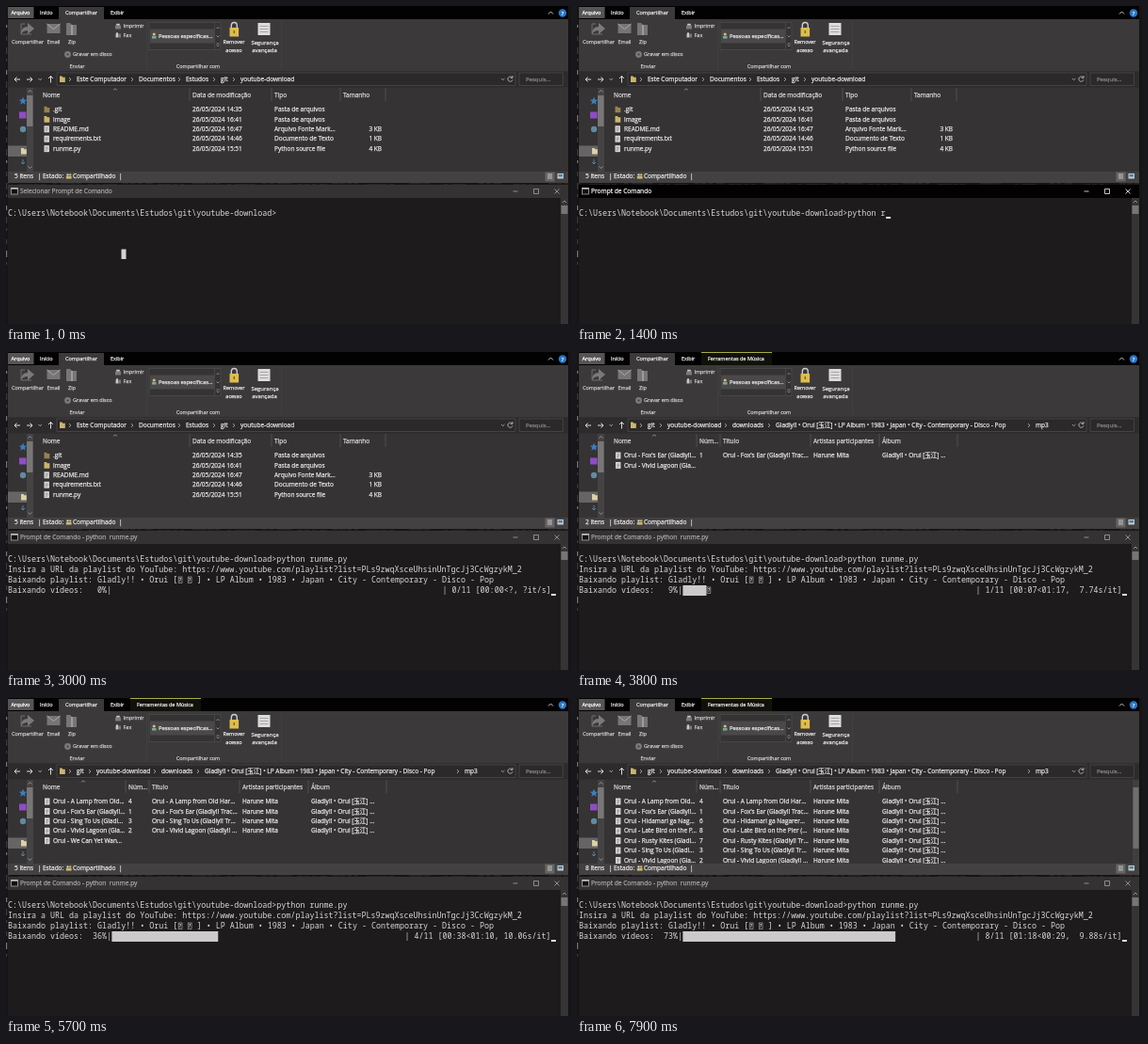
An HTML page for the animation above (8 s loop, 600 by 338 pixels).

```html
<!DOCTYPE html>
<html lang="pt">
<head>
<meta charset="utf-8">
<title>Baixando playlist</title>
<style>
html, body { margin: 0; width: 100%; height: 100%; overflow: hidden; background: #161415; }
svg { display: block; width: 100vw; height: 100vh; }
text { white-space: pre; font-family: "Open Sans", "Noto Sans", "Noto Sans CJK JP", sans-serif; }
.mono { font: 500 8.36px "Noto Sans Mono", "DejaVu Sans Mono", monospace; fill: #dad8d9; }
</style>
</head>
<body>
<svg viewBox="0 0 600 338" preserveAspectRatio="none">
  <defs><clipPath id="list"><rect x="30" y="86" width="567" height="90"/></clipPath></defs>
  <g id="fixed"></g>
  <g id="explorer"></g>
  <g id="terminal"></g>
</svg>
<script>
const LOOP = 8000;
const CELL = 5.017, COLS = 115, LINE = 11;
const ARTIST = 'Orui', KANJI = '玉江', ALBUM = 'Gladly!!', COMPOSER = 'Harune Mita';
const ALBUM_TAIL = ' • LP Album • 1983 • Japan • City - Contemporary - Disco - Pop';
const ALBUM_FULL = `${ALBUM} • ${ARTIST} [${KANJI}]${ALBUM_TAIL}`;
const PROMPT = 'C:\\Users\\Notebook\\Documents\\Estudos\\git\\youtube-download>';
const COMMAND = 'python runme.py';
const ASK = 'Insira a URL da playlist do YouTube: ';
const URL_TEXT = 'https://www.youtube.com/playlist?list=PLs9zwqXsceUhsinUnTgcJj3CcWgzykM_2';

// In download order; done is the time at which the counter advances.
const tracks = [
  { song: "Fox's Ear", done: 3600, stat: '00:07<01:17,  7.74' },
  { song: 'Vivid Lagoon', done: 4200, stat: '00:18<01:24,  9.38' },
  { song: 'Sing To Us', done: 4750, stat: '00:28<01:18,  9.82' },
  { song: 'A Lamp from Old Harbor', done: 5300, stat: '00:38<01:10, 10.06' },
  { song: 'We Can Yet Wander', done: 5900, stat: '00:48<01:00, 10.12' },
  { song: 'Hidamari ga Nagareru', done: 6450, stat: '00:58<00:50, 10.16' },
  { song: 'Rusty Kites', done: 7100, stat: '01:08<00:40, 10.02' },
  { song: 'Late Bird on the Pier', done: 7700, stat: '01:18<00:29,  9.88' }
];
tracks.forEach((track, i) => {
  track.number = i + 1;
  track.seen = i ? tracks[i - 1].done + 200 : 3300;
  track.title = `${ARTIST} - ${track.song} (${ALBUM} Track ${i + 1})`;
});
const sorted = [...tracks].sort((a, b) => a.song < b.song ? -1 : 1);

const TIMES = { focus: 900, type: 1000, run: 1750, ask: 1850, paste: 2150, playlist: 2350, bar: 2650, blur: 3000, open: 3300 };

const $ = id => document.getElementById(id);
const escapeText = s => String(s).replace(/&/g, '&amp;').replace(/</g, '&lt;');
const rect = (x, y, w, h, fill, extra = '') =>
  `<rect x="${x}" y="${y}" width="${w}" height="${h}" fill="${fill}" ${extra}/>`;
const circle = (x, y, r, fill) => `<circle cx="${x}" cy="${y}" r="${r}" fill="${fill}"/>`;
const stroke = (d, color, width = 1) => `<path d="${d}" fill="none" stroke="${color}" stroke-width="${width}"/>`;
const shape = (d, fill) => `<path d="${d}" fill="${fill}"/>`;
// y is the middle of the line
const label = (x, y, s, size = 6.5, fill = '#e6e4e5', anchor = 'start') =>
  `<text x="${x}" y="${y + size * 0.34}" font-size="${size}" fill="${fill}" stroke="${fill}" stroke-width=".25" text-anchor="${anchor}">${escapeText(s)}</text>`;
const folder = (x, y, fill = '#cdb46a') => shape(`M${x} ${y}h2.4l1 1.2h2.4v5.4h-5.8z`, fill);
const page = (x, y) => rect(x, y, 5.4, 7, '#dddbdc') + stroke(`M${x + 1.2} ${y + 2.2}h3m-3 1.6h3m-3 1.6h2`, '#777', .7);

const meter = document.createElement('canvas').getContext('2d');
function fit(s, width) {
  meter.font = '6.5px "Open Sans", "Noto Sans", "Noto Sans CJK JP", sans-serif';
  if (meter.measureText(s).width <= width) return s;
  while (meter.measureText(s + '...').width > width) s = s.slice(0, -1);
  return s + '...';
}

function drawRibbon() {
  const grey = '#7b797a', soft = '#c9c7c8', ink = '#e6e4e5';
  return rect(2, 0, 595, 14, '#030203') + rect(2, 1, 27.5, 12, '#565455') + rect(56, 1, 48, 13, '#3b393a') +
    label(15.5, 7, 'Arquivo', 5.5, '#fff', 'middle') + label(36, 7.5, 'Início', 5.5) +
    label(63, 7.5, 'Compartilhar', 5.5) + label(111, 7.5, 'Exibir', 5.5) +
    stroke('M576 8.5l2.5-2.5 2.5 2.5', '#ccc') + circle(591, 7.5, 4.2, '#2878c8') +
    label(591, 7.5, '?', 6, '#fff', 'middle') +
    rect(2, 14, 595, 55.5, '#3b393a') +
    shape('M23 18l7 6-7 6v-4q-5 0-7 4 0-8 7-8z', grey) + stroke('M20 19h-4v11h11', grey, .8) +
    rect(43.5, 19, 14, 10, '#777576') + stroke('M43.5 19l7 5.5 7-5.5', '#aaa') +
    shape('M64 18h4l2 2h5v11h-11z', '#777576') + stroke('M70 20v11', '#aaa', 1.5) +
    label(23, 38.5, 'Compartilhar', 5.5, soft, 'middle') + label(50.5, 38.5, 'Email', 5.5, soft, 'middle') +
    label(70, 38.5, 'Zip', 5.5, soft, 'middle') +
    rect(116, 20.5, 6, 4, grey) + rect(117.2, 18.8, 3.6, 1.8, soft) + label(124.5, 21.5, 'Imprimir', 5.4, soft) +
    rect(116, 29.5, 6, 4, grey) + rect(117, 28.3, 2, 5, soft) + label(124.5, 31.5, 'Fax', 5.5, soft) +
    circle(65.5, 51.5, 3.4, grey) + circle(65.5, 51.5, 1, '#3b393a') + label(71, 51.5, 'Gravar em disco', 5.5, soft) +
    label(75.5, 64, 'Enviar', 5.5, soft, 'middle') + label(204, 64, 'Compartilhar com', 5.5, soft, 'middle') +
    stroke('M149.5 16v51M292.5 16v51', '#444243', .8) +
    rect(152, 17.5, 76, 29, '#353334', 'stroke="#4f4d4e" stroke-width=".7"') + rect(153, 24.5, 68, 15, '#4a4849') +
    circle(157.2, 30, 1.6, '#d4bd67') + rect(155, 32, 4.5, 2.6, '#78a8a0') +
    label(162, 32, 'Pessoas específicas...', 5.85) +
    stroke('M221.5 17.5v29', '#4f4d4e', .7) +
    stroke('M223.5 24l1.5-1.5 1.5 1.5M223.5 31.5l1.5 1.5 1.5-1.5M223.5 40h3M223.5 41.5l1.5 1.5 1.5-1.5', '#aaa', .7) +
    stroke('M239.3 24v-3q0-3.5 3-3.5t3 3.5v3', '#cfcdce', 1.4) + rect(237.5, 23, 9.6, 9.5, '#dfbd4c') + rect(241.6, 26, 1.4, 3, '#73602a') +
    label(242, 38.5, 'Remover', 5.5, ink, 'middle') + label(242, 47, 'acesso', 5.5, ink, 'middle') +
    rect(267.5, 18, 13, 13, '#dedcdd') + stroke('M269.5 21.5h9M269.5 24.5h9M269.5 27.5h9', '#999', .8) +
    label(275, 38.5, 'Segurança', 6, ink, 'middle') + label(274.5, 47, 'avançada', 6, ink, 'middle');
}

function drawFrame() {
  let flecks = '';
  for (let i = 0; i < 60; i++) flecks += rect((i * 37) % 600, 188.5 + i % 2, 4 + i % 5, .7, '#343233');
  for (let i = 0; i < 22; i++) flecks += rect(0, 20 + i * 12, 1.2, 3 + i % 3 * 2, i % 4 ? '#3b393a' : '#777');
  const nav = stroke('M9 78h6M11.5 75.5l-2.5 2.5 2.5 2.5', '#ddd') + stroke('M22 78h6M25.5 75.5l2.5 2.5-2.5 2.5', '#ddd') +
    stroke('M34.5 77l1.7 1.7 1.7-1.7', '#ccc', .8) + stroke('M47.5 81.5v-7M45 77l2.5-2.5 2.5 2.5', '#ddd');
  const side = rect(2, 148.5, 20, 11.5, '#666465') + shape('M18 96.5l1.2 3 3 .2-2.3 2 .8 3-2.7-1.7-2.7 1.7.8-3-2.3-2 3-.2z', '#3a7fbd') +
    rect(14, 112.5, 7.5, 7, '#8f4cc4') + circle(18, 131, 3.2, '#5f8ba3') + folder(16, 151, '#ddd2a4') +
    stroke('M18 163v5M16 166l2 2 2-2', '#658aa8', .9);
  return flecks + rect(2, 0, 595, 188, '#353334') + drawRibbon() +
    rect(2, 69.5, 595, 17, '#2d2b2c') + nav +
    rect(54, 71, 487, 13.5, '#2b292a', 'stroke="#4f4d4e" stroke-width=".7"') +
    rect(545, 71, 46.5, 13.5, '#2b292a', 'stroke="#4f4d4e" stroke-width=".7"') +
    folder(57, 74.5) + label(552, 78, 'Pesquis...', 6, '#858384') +
    stroke('M526 77l1.7 1.7 1.7-1.7', '#bbb', .8) + stroke('M537.5 76a2.6 2.6 0 1 0 .5 2.3M538 74v2.4h-2.3', '#ccc', .8) +
    side + rect(22, 87, 7, 89, '#444243') + rect(22, 95, 6.5, 33, '#787677') +
    stroke('M23.5 91.5l2-2 2 2M23.5 170.5l2 2 2-2', '#aaa', .8) +
    rect(2, 176, 595, 12, '#434142') + label(34, 181, '|', 6.3) + label(120, 181, '|', 6.3) + label(39, 181, 'Estado:') +
    circle(65.5, 179.5, 1.2, '#ccc') + circle(68.2, 179.5, 1.2, '#d1b862') + rect(63.8, 181, 5.8, 2.6, '#c9b873') +
    label(71, 181, 'Compartilhado') +
    rect(572.5, 176.5, 10, 10, '#666465') + stroke('M575 179h5M575 181h5M575 183h5', '#ddd', .8) +
    rect(585.5, 178, 6.5, 5.5, '#ccc') + rect(586.5, 179, 4.5, 2.5, '#4582aa') +
    rect(2, 203, 595, 135, '#1d1b1c') + rect(589, 204, 8, 134, '#363435') +
    rect(589.5, 212, 7, 9, '#777576') + stroke('M591 209l2-2 2 2', '#aaa', .8);
}

const crumbs = items => items.map(([x, name]) =>
  stroke(`M${x - 8} 76l1.8 2-1.8 2`, '#bbb', .8) + label(x, 78, name)).join('');
const header = (columns, edges) =>
  columns.map(([x, name]) => label(x, 94.5, name, 6.5, '#d8d6d7')).join('') +
  edges.map(x => stroke(`M${x} 87v14`, '#5d5b5c', .7)).join('');
const rowY = i => 110 + i * 10.42;

function drawRepository() {
  const rows = [
    ['.git', '14:35', 'Pasta de arquivos'], ['image', '16:41', 'Pasta de arquivos'],
    ['README.md', '16:47', 'Arquivo Fonte Mark...', '3 KB'],
    ['requirements.txt', '14:46', 'Documento de Texto', '1 KB'],
    ['runme.py', '15:51', 'Python source file', '4 KB']
  ];
  return crumbs([[75, 'Este Computador'], [141, 'Documentos'], [191, 'Estudos'], [228, 'git'], [249, 'youtube-download']]) +
    header([[39, 'Nome'], [198, 'Data de modificação'], [285, 'Tipo'], [358, 'Tamanho']], [195, 282, 355, 403]) +
    stroke('M114 89.5l2-1.7 2 1.7', '#aaa', .7) +
    rows.map(([name, time, kind, size], i) => {
      const y = rowY(i);
      return (i < 2 ? folder(40.5, y - 3.3, i ? '#cdb46a' : '#96834d') : page(40.5, y - 3.5)) +
        label(50, y, name) + label(198, y, '26/05/2024 ' + time) + label(285, y, kind) +
        (size ? label(399, y, size, 6.5, '#e6e4e5', 'end') : '');
    }).join('') + label(9, 181, '5 itens');
}

function drawMusic(t) {
  const files = sorted.filter(track => t >= track.seen);
  const rows = files.map((track, i) => {
    const y = rowY(i);
    const tags = t < track.done ? '' : label(130, y, track.number) + label(155, y, fit(track.title, 91)) +
      label(251, y, COMPOSER) + label(324, y, `${ALBUM} • ${ARTIST} [${KANJI}] ...`);
    return page(41, y - 3.5) + label(50, y, fit(track.title, 77)) + tags;
  }).join('');
  return rect(132, 0, 75, 14, '#10110a') + rect(132, 0, 75, 1, '#a9ad45') + label(139, 7.5, 'Ferramentas de Música', 5.5) +
    crumbs([[75, 'git'], [96, 'youtube-download'], [165, 'downloads'], [211, ALBUM_FULL], [487, 'mp3']]) +
    header([[39, 'Nome'], [130, 'Núm...'], [155, 'Título'], [251, 'Artistas participantes'], [324, 'Álbum']], [127, 152, 248, 321, 404]) +
    stroke('M80 89.5l2-1.7 2 1.7', '#aaa', .7) +
    `<g clip-path="url(#list)">${rows}</g>` +
    (files.length > 6 ? rect(590, 87, 7, 89, '#403e3f') + rect(590.5, 95, 6, 65, '#706e6f') : '') +
    label(9, 181, `${files.length} ite${files.length > 1 ? 'ns' : 'm'}`);
}

const colX = col => 2 + col * CELL;
const lineY = row => 223 + row * LINE;
const mono = (col, row, s) => `<text class="mono" x="${colX(col)}" y="${lineY(row)}">${escapeText(s)}</text>`;
const caret = (col, row) => rect(colX(col), lineY(row) + 1, CELL, 2, '#e0dedf');
const missing = (col, row) =>
  rect(colX(col) + .6, lineY(row) - 6, 3.8, 6.6, 'none', 'stroke="#bbb" stroke-width=".6"') +
  label(colX(col) + 2.5, lineY(row) - 2.6, '?', 5, '#ccc', 'middle');

function drawPlaylist() {
  const head = `Baixando playlist: ${ALBUM} • ${ARTIST} [`, n = head.length;
  return mono(0, 2, head) + missing(n, 2) + missing(n + 2, 2) + mono(n + 4, 2, ']' + ALBUM_TAIL);
}

function drawProgress(t) {
  const done = tracks.filter(track => t >= track.done).length;
  const stat = done ? `| ${done}/11 [${tracks[done - 1].stat}s/it]` : '| 0/11 [00:00<?, ?it/s]';
  const percent = String(Math.round(done / 11 * 100)).padStart(3);
  const start = 22, width = COLS - stat.length - start;
  const eighths = Math.floor(width * done / 11 * 8);
  const full = eighths >> 3, part = eighths & 7;
  // The console font only has the half block among the partial ones.
  const filled = full + (part === 4 ? .5 : 0);
  return mono(0, 3, `Baixando vídeos: ${percent}%|`) +
    rect(colX(start), lineY(3) - 8, filled * CELL, LINE, '#cccacb') +
    (part && part !== 4 ? missing(start + full, 3) : '') +
    mono(COLS - stat.length, 3, stat) + caret(COLS, 3);
}

function drawTerminal(t) {
  const T = TIMES, active = t >= T.focus && t < T.blur;
  const ink = active ? '#f4f2f3' : '#a5a3a4';
  const title = t < T.focus ? 'Selecionar Prompt de Comando'
    : 'Prompt de Comando' + (t >= T.run ? ' - python  runme.py' : '');
  const typed = COMMAND.slice(0, Math.max(0, Math.floor((t - T.type) / 50)));
  let out = rect(2, 190, 595, 14, active ? '#030203' : '#343233') +
    rect(5.5, 193.5, 7, 6.5, '#111', 'stroke="#aaa" stroke-width=".8"') + rect(5.5, 193.2, 7, 1.5, '#ccc') +
    label(15, 197, title, 6.6, ink) +
    stroke('M538.5 197h5M560.5 194.5h5v5h-5zM582.5 194.5l5 5m0-5l-5 5', ink, .8) +
    mono(0, 0, PROMPT + typed);
  if (t < T.focus) out += rect(122.5, 258.5, 5, 10.5, '#d4d2d3');
  else if (t < T.ask) out += caret(PROMPT.length + typed.length, 0);
  if (t >= T.ask) {
    const line = ASK + (t >= T.paste ? URL_TEXT : '');
    out += mono(0, 1, line);
    if (t < T.playlist) out += caret(line.length, 1);
  }
  if (t >= T.playlist) out += drawPlaylist();
  if (t >= T.bar) out += drawProgress(t);
  else if (t >= T.playlist) out += caret(0, 3);
  return out;
}

function put(id, markup) {
  const node = $(id);
  if (node.markup !== markup) node.innerHTML = node.markup = markup;
}
function render(t) {
  put('explorer', t < TIMES.open ? drawRepository() : drawMusic(t));
  put('terminal', drawTerminal(t));
}

$('fixed').innerHTML = drawFrame();
const began = performance.now();
function tick() {
  render((performance.now() - began) % LOOP);
  requestAnimationFrame(tick);
}
tick();
</script>
</body>
</html>
```
